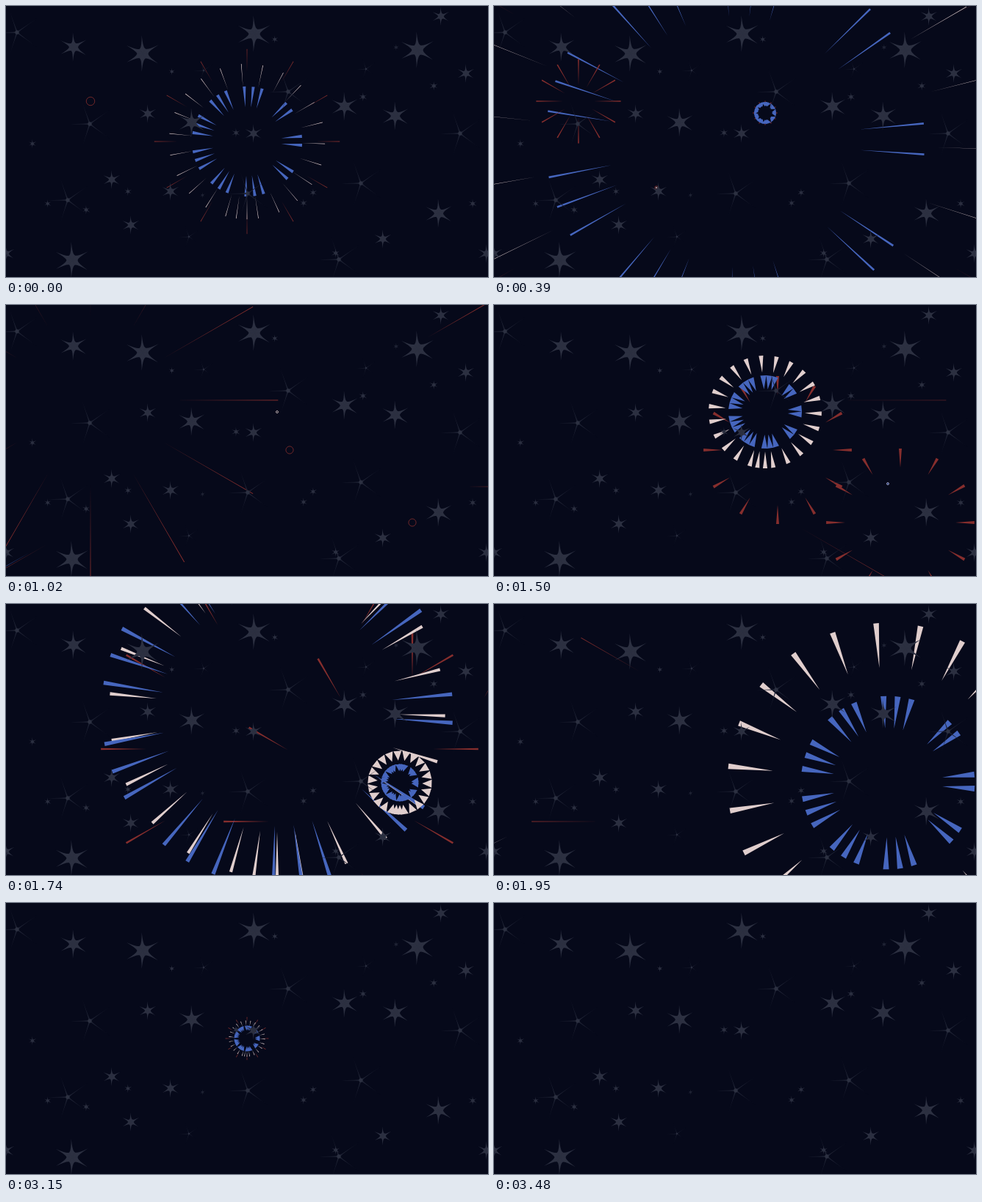
Write an HTML page with a canvas that moves like this. It is 656 px wide and 370 px high and loops after 3600 ms.

```html
<!DOCTYPE html>
<html lang="en">
<head>
<meta charset="utf-8">
<title>Night fireworks</title>
<style>
html, body { margin: 0; width: 100%; height: 100%; overflow: hidden; background: #06091a; }
canvas { display: block; width: 656px; height: 370px; }
</style>
</head>
<body>
<canvas id="stage" width="656" height="370"></canvas>
<script>
const W = 656, H = 370, LOOP = 3600, SHOW = 3480, FADE = 600;
const ctx = document.getElementById('stage').getContext('2d');
const range = n => [...Array(n).keys()];
const polar = (x, y, deg, d) => {
  const a = deg * Math.PI / 180;
  return [x + Math.cos(a) * d, y + Math.sin(a) * d];
};

// Blue rays stand in threes, but in twos on the right-hand side
const blueAngles = range(27)
  .map(n => [Math.floor(n / 3), n % 3])
  .filter(([i, j]) => !(i < 2 && j === 2) && !(i === 8 && j === 0))
  .map(([i, j]) => -5.5 + i * 38.95 + j * 9.4);
const whiteAngles = [90, 98, ...range(22).map(i => 106 + i * 15.98)];
const redAngles = range(12).map(i => i * 30);

const red = { color: '#862e2d', angles: redAngles, hollow: .74 };
const white = { color: '#e0cecd', angles: whiteAngles, hollow: .7 };
const blue = { color: '#4666be', angles: blueAngles, hollow: .62 };
const longRed = { ...red, hollow: .36, power: 2 };

// Each burst: centre, then rings of [kind, start, time to reach radius 100, ray width]
const bursts = [
  [328, 185, [red, -1079, 1018, 1], [white, -1079, 1063, .9], [blue, -1079, 1159, 4.8]],
  [115, 130, [longRed, -180, 751, 1.8]],
  [98, 78, [white, 350, 415, 2.6]],
  [369, 146, [red, -100, 768, 1.3], [blue, -56, 720, 9]],
  [221, 248, [red, 171, 568, 6.5], [white, 240, 499, 9], [blue, 420, 363, 9]],
  [386, 198, [red, 588, 910, 4.8]],
  [553, 297, [red, 588, 910, 4.8]],
  [369, 146, [white, 734, 818, 7], [blue, 1000, 595, 9]],
  [536, 244, [white, 1318, 520, 12], [blue, 1294, 629, 10]]
];

function drawRing(x, y, [kind, start, pace, width], t) {
  const r = t > start ? 100 * ((t - start) / pace) ** (kind.power || 4) : 0;
  if (r < .8 || r > FADE) return;
  ctx.fillStyle = ctx.strokeStyle = kind.color;
  ctx.beginPath();
  if (r < 6) {
    ctx.lineWidth = .8;
    ctx.arc(x, y, r, 0, 7);
    ctx.stroke();
    return;
  }
  // Rays get thinner and the hole wider as the ring grows
  const grown = r / FADE;
  const inner = r * (kind.hollow + (.85 - kind.hollow) * grown * grown);
  const thick = Math.min(Math.max(.7, width * (1 - grown)), .52 * r);
  for (const a of kind.angles) {
    const tip = polar(x, y, a, r);
    ctx.moveTo(...polar(x, y, a, inner));
    ctx.lineTo(...polar(...tip, a + 90, thick / 2));
    ctx.lineTo(...polar(...tip, a - 90, thick / 2));
    ctx.closePath();
  }
  ctx.fill();
}

const sky = document.createElement('canvas');
sky.width = W;
sky.height = H;
const pen = sky.getContext('2d');

function spike(x, y, angle, length, base, spread) {
  pen.beginPath();
  pen.moveTo(...polar(x, y, angle - spread, base));
  pen.quadraticCurveTo(...polar(x, y, angle - 5, base * 1.2), ...polar(x, y, angle, length));
  pen.quadraticCurveTo(...polar(x, y, angle + 5, base * 1.2), ...polar(x, y, angle + spread, base));
  pen.lineTo(x, y);
  pen.fill();
}

function disc(x, y, r) {
  pen.beginPath();
  pen.arc(x, y, r, 0, 7);
  pen.fill();
}

function solidStar(x, y, size) {
  pen.fillStyle = size < 5 ? '#202435' : '#2c3041';
  disc(x, y, size * .31);
  for (const i of range(6)) spike(x, y, -93 + i * 65 - i * i, size, size * .31, 25);
}

function thinStar(x, y, size) {
  pen.fillStyle = '#1e2233';
  for (const i of range(5)) spike(x, y, -35 + i * 71.5, size, size * .06, 40);
  pen.fillStyle = '#2c3041';
  disc(x, y, Math.max(1.2, size * .08));
}

// The pattern repeats part of itself further right and down
const scatter = (draw, size, points) => points.forEach(([x, y]) => draw(x, y, size));
const twice = points => points.flatMap(([x, y]) => [[x, y], [x + 369, y + 81]]);

scatter(solidStar, 25, [[338, 38], [186, 65], [90, 347], [560, 60]]);
scatter(solidStar, 20, [...twice([[92, 56]]), [530, 150], [253, 159], [589, 283]]);
scatter(solidStar, 13, [
  ...twice([[144, 237]]), [193, 147], [337, 174], [224, 253],
  [626, 92], [170, 299], [0, 338], [654, 338], [592, 14]
]);
scatter(solidStar, 6, twice([[36, 188]]));
scatter(thinStar, 33, [...twice([[15, 36], [114, 161], [84, 265]]), [618, 174], [329, 256]]);
scatter(thinStar, 15, [[490, 86], [269, 88], [249, 315]]);

// Faint specks between the larger stars
let seed = 7;
const random = () => (seed = seed * 16807 % 2147483647) / 2147483647;
for (const i of range(14))
  solidStar((i + random()) * W / 14, random() * H, 4 + random() * 3);

function draw(t) {
  ctx.fillStyle = '#06091a';
  ctx.fillRect(0, 0, W, H);
  if (t < SHOW) {
    // The first burst opens at the tail of the loop
    const clock = t >= 2600 ? t - SHOW : t;
    for (const [x, y, ...rings] of bursts)
      for (const ring of rings) drawRing(x, y, ring, clock);
  }
  ctx.drawImage(sky, 0, 0);
}

const begin = performance.now();
function tick() {
  const t = (performance.now() - begin) % LOOP;
  draw(Math.floor(t / 30) * 30);
  requestAnimationFrame(tick);
}
tick();
</script>
</body>
</html>
```
